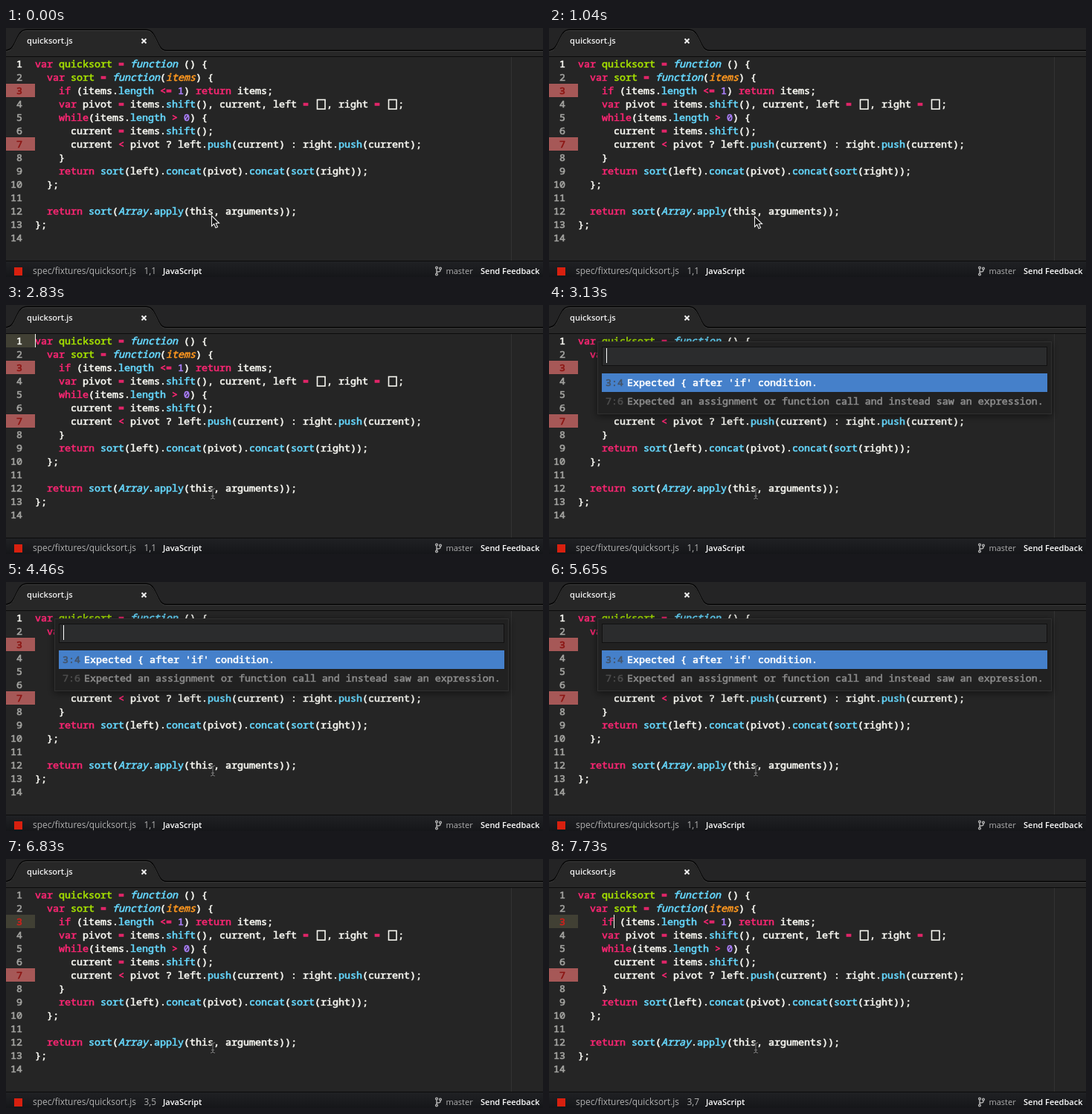
An HTML page with a canvas for the animation above (8 s loop, 722 by 335 pixels).

```html
<!DOCTYPE html>
<html lang="en">
<head>
<meta charset="utf-8">
<title>quicksort.js</title>
<style>
html, body { margin: 0; width: 722px; height: 335px; overflow: hidden; background: #252525; }
canvas { display: block; }
</style>
</head>
<body>
<canvas id="stage" width="722" height="335"></canvas>
<script>
const c = document.getElementById('stage').getContext('2d');
const LOOP = 8000, LEFT = 39, TOP = 39, ROW = 18, CELL = 8;
const MONO = '13.333px "Noto Sans Mono", "DejaVu Sans Mono", monospace';
const UI = '"Open Sans", "Noto Sans", sans-serif';
const WHITE = '#f8f8f2', PINK = '#f92672', CYAN = '#66d9ff';

const CODE = `var quicksort = function () {
  var sort = function(items) {
    if (items.length <= 1) return items;
    var pivot = items.shift(), current, left = [], right = [];
    while(items.length > 0) {
      current = items.shift();
      current < pivot ? left.push(current) : right.push(current);
    }
    return sort(left).concat(pivot).concat(sort(right));
  };

  return sort(Array.apply(this, arguments));
};
`.split('\n');

// The first matching rule gives a token its colour and slant.
const RULES = [
  [/^(var|if|return|while|=|<=|<|>)$/, PINK],
  [/^(function|Array)$/, CYAN, true],
  [/^(length|shift|push|concat|apply|sort)$/, CYAN],
  [/^\d+$/, '#ae81ff'],
  [/./, WHITE]
];

// Times at which each caret turns on and off, in turn.
const BLINKS = [1490, 1640, 2090, 2540, 2830, 3280, 3720, 4010, 4460, 4910,
  5200, 5650, 5800, 6090, 6390, 6830, 7280, 7580, 7730];

function text(s, x, y, color, font) {
  c.font = font;
  c.fillStyle = color;
  c.fillText(s, x, y);
}

// A thin outline gives the code its medium weight.
function mono(s, x, y, color, italic) {
  text(s, x, y, color, (italic ? 'italic ' : '') + MONO);
  c.strokeStyle = color;
  c.lineWidth = 0.6;
  c.strokeText(s, x, y);
}

function rect(x, y, w, h, color) {
  c.fillStyle = color;
  c.fillRect(x, y, w, h);
}

function fade(y, h, from, to) {
  const g = c.createLinearGradient(0, y, 0, y + h);
  g.addColorStop(0, from);
  g.addColorStop(1, to);
  rect(0, y, 722, h, g);
}

function stroke(path, color, width = 1) {
  c.strokeStyle = color;
  c.lineWidth = width;
  c.stroke(new Path2D(path));
}

function style(token, line, at) {
  const before = line.slice(0, at);
  if (/var $/.test(before) && /^ = function/.test(line.slice(at + token.length)))
    return ['#a6e200'];
  if (/function\($/.test(before)) return ['#fd971f', true];
  return RULES.find(r => r[0].test(token)).slice(1);
}

function drawLine(line, row) {
  const y = TOP + row * ROW + 14;
  for (const m of line.matchAll(/\w+|<=|\[\]|[^\w\s]/g)) {
    const x = LEFT + m.index * CELL;
    if (m[0] === '[]') {
      // the two brackets join into one box
      c.strokeStyle = WHITE;
      c.lineWidth = 1.6;
      c.strokeRect(x + 3.5, y - 10.5, 10.5, 12.5);
    } else {
      mono(m[0], x, y, ...style(m[0], line, m.index));
    }
  }
}

function drawGutter(current, focused) {
  CODE.forEach((_, i) => {
    const n = i + 1, y = TOP + i * ROW;
    const error = n === 3 || n === 7, active = n === current;
    if (active && focused) rect(0, y, LEFT, ROW, '#414034');
    else if (error) rect(0, y, LEFT, ROW, '#a65857');
    const color = error ? (active && focused ? '#d0211c' : '#8b1512')
      : active ? WHITE : '#a5a5a2';
    mono(String(n), n < 10 ? 14 : 6, y + 14, color);
  });
}

function drawTabs() {
  rect(0, 0, 722, 31, '#242425');
  const edge = 'M-2 30.5C8 30.5 10 24 14 16C18 8 20 2.5 28 2.5H188C196 2.5 198 8 202 16C206 24 208 30.5 216 30.5H723';
  c.fillStyle = '#272727';
  c.fill(new Path2D(edge + 'V38H-2Z'));
  stroke(edge, '#050505', 2);
  c.save();
  c.translate(0, 1);
  stroke(edge, '#3b3b3b');
  c.restore();
  rect(0, 38, 722, 1, '#0c0c0c');
  text('quicksort.js', 28, 21, '#f0f0f0', '600 11.1px ' + UI);
  stroke('M182.5 14.5L188.5 20.5M188.5 14.5L182.5 20.5', '#f0f0f0', 2);
}

function drawStatus(position) {
  fade(314, 21, '#202124', '#151619');
  rect(0, 313, 722, 1, '#0b0b0b');
  rect(11, 322, 11, 11, '#d8200f');
  const gray = '#b0b0b0';
  text('spec/fixtures/quicksort.js', 36, 331, gray, '11.9px ' + UI);
  text(position, 185.5, 331, gray, '11.9px ' + UI);
  text('JavaScript', 211, 331, '#ffffff', '600 11px ' + UI);
  stroke('M579 324V330M584 325V326Q584 328 581 328Q579 328 579 330', gray, 1.4);
  for (const [x, y] of [[579, 322.5], [579, 331.5], [584, 323.5]]) {
    c.beginPath();
    c.arc(x, y, 1.4, 0, 7);
    c.stroke();
  }
  text('master', 591.5, 331, gray, '11px ' + UI);
  text('Send Feedback', 638, 331, '#ffffff', '600 11px ' + UI);
}

function drawPanel() {
  c.save();
  c.shadowColor = 'rgba(0,0,0,.55)';
  c.shadowBlur = 10;
  c.shadowOffsetY = 2;
  rect(65, 49, 611, 98, '#212121');
  c.restore();
  c.lineWidth = 1;
  c.strokeStyle = '#303030';
  c.strokeRect(65.5, 49.5, 610, 97);
  rect(71, 56, 599, 26, '#2b2c2d');
  c.strokeStyle = '#111111';
  c.strokeRect(71.5, 56.5, 598, 25);
  rect(71, 92, 599, 25, '#4580ca');
  mono('3:4', 76, 109, '#44546a');
  mono("Expected { after 'if' condition.", 105, 109, '#ffffff');
  mono('7:6', 76, 134, '#4c4c4c');
  mono('Expected an assignment or function call and instead saw an expression.', 105, 134, '#8c8c8c');
}

function drawPointer(t) {
  c.save();
  if (t < 1490) {
    c.translate(276.5, t < 1040 ? 252.5 : 253.5);
    const arrow = 'M0 0V14L3.2 11L5.5 16.3L8 15.2L5.7 10H10Z';
    c.fillStyle = '#151515';
    c.fill(new Path2D(arrow));
    stroke(arrow, '#eeeeee', 1.1);
  } else {
    c.translate(278, 254);
    const beam = 'M-3 -7Q0 -7 0 -5Q0 -7 3 -7M0 -5V5M-3 7Q0 7 0 5Q0 7 3 7M-2 3H2';
    stroke(beam, '#1b1b1b', 2.4);
    stroke(beam, '#868686', 1);
  }
  c.restore();
}

function draw(t) {
  const panel = t >= 3130 && t < 5800, jumped = t >= 5800, moved = t >= 7730;
  const focused = t >= 1490 && !panel;
  const caretOn = BLINKS.filter(b => b <= t).length % 2 === 1;
  rect(0, 0, 722, 335, '#252525');
  rect(679, 38, 1, 276, '#333333');
  drawGutter(jumped ? 3 : 1, focused);
  CODE.forEach(drawLine);
  drawPointer(t);
  if (panel) drawPanel();
  drawTabs();
  drawStatus(moved ? '3,7' : jumped ? '3,5' : '1,1');
  if (!caretOn) return;
  if (panel) rect(77, 58, 1, 20, '#ffffff');
  else rect(moved ? 87 : jumped ? 71 : 39, jumped ? 75 : 39, 1, ROW, '#f8f8f0');
}

const start = performance.now();
function tick() {
  draw((performance.now() - start) % LOOP);
  requestAnimationFrame(tick);
}
tick();
</script>
</body>
</html>
```
